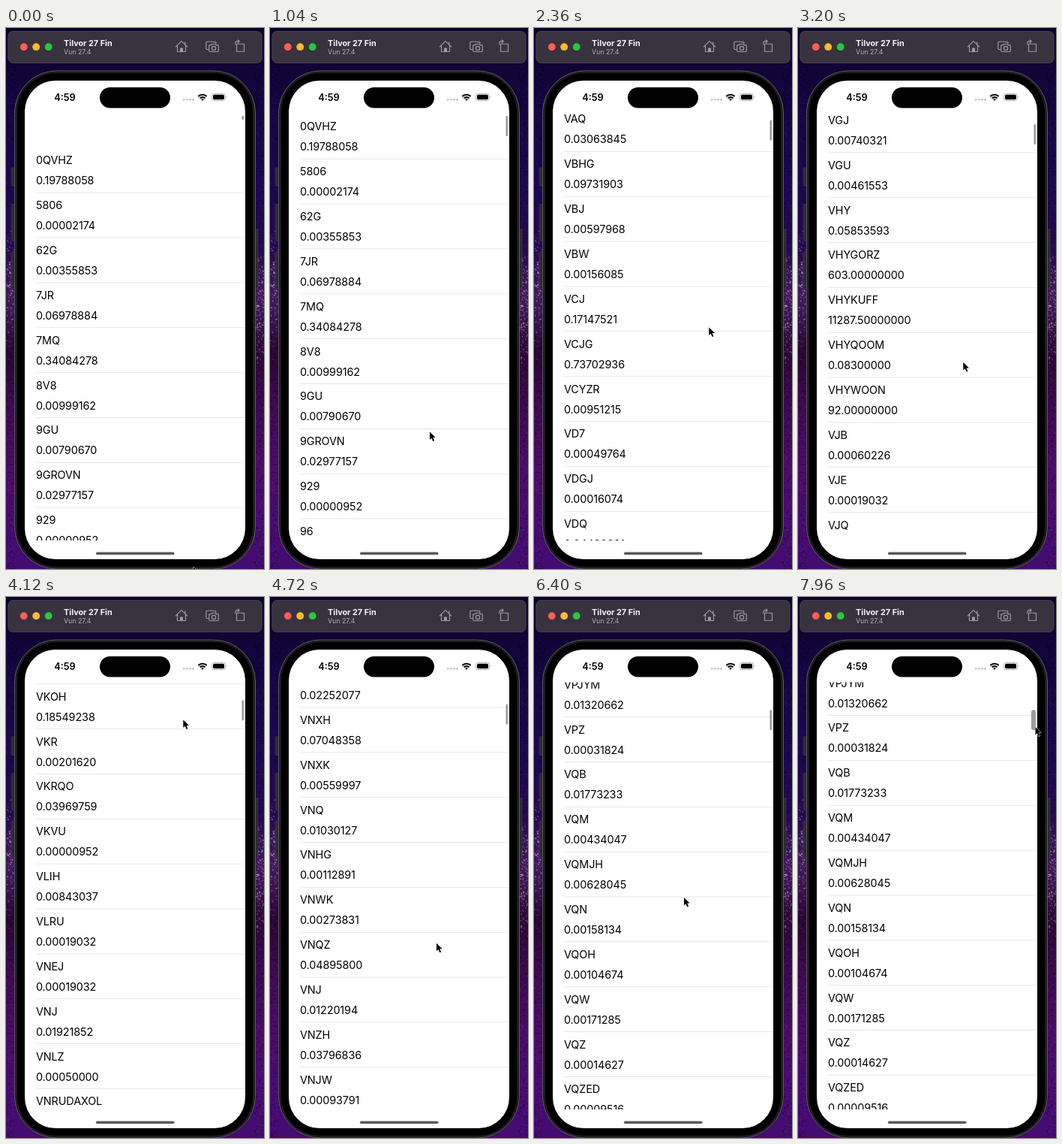
An HTML page with a canvas for the animation above (8000 ms loop, 344 by 720 pixels).

```html
<!DOCTYPE html>
<html lang="en">
<head>
<meta charset="utf-8">
<title>Scrolling price list</title>
<style>
  html, body { margin: 0; width: 100%; height: 100%; overflow: hidden; background: #14043a; }
  canvas, svg { position: absolute; left: 0; top: 0; width: 344px; height: 720px; display: block; }
  text { font-family: Inter, "Liberation Sans", sans-serif; }
  .row text { font-size: 14.4px; letter-spacing: -0.1px; fill: #000; }
  .row rect { fill: #e2e2e3; }
  .icon { fill: none; stroke: #a19aa7; stroke-width: 1.15; stroke-linejoin: round; stroke-linecap: round; }
</style>
</head>
<body>
<canvas id="wall" width="344" height="720"></canvas>
<svg viewBox="0 0 344 720">
  <defs>
    <clipPath id="listArea"><rect x="25" y="113.5" width="294" height="568.5"/></clipPath>
  </defs>

  <!-- window bar -->
  <rect x="2.5" y="4" width="339" height="43" rx="7" fill="#39323f"/>
  <rect x="3" y="4.5" width="338" height="42" rx="6.5" fill="none" stroke="#4d4654" stroke-width=".7"/>
  <circle cx="23.8" cy="25.2" r="4.9" fill="#ff5f57"/>
  <circle cx="40.2" cy="25.2" r="4.9" fill="#febc2e"/>
  <circle cx="56.7" cy="25.2" r="4.9" fill="#28c840"/>
  <text x="77" y="24" font-size="10.8" font-weight="700" fill="#f4f1f6">Tilvor 27 Fin</text>
  <text x="77" y="35.2" font-size="8.8" fill="#b3acb8">Vun 27.4</text>
  <g class="icon">
    <path d="M226.3 25L234 17.700L241.700 25M228.500 23.500V31.500H239.500V23.500M238.900 22V18.800"/>
    <path d="M232.600 31.500V27H235.400V31.500Z" fill="#a19aa7"/>
    <path d="M269.500 28.500H268.300a1.500 1.500 0 0 1-1.500-1.500V19.700a1.500 1.500 0 0 1 1.500-1.500H278.500a1.500 1.500 0 0 1 1.500 1.500V20.500"/>
    <path d="M272.200 22.600H273.800L274.800 21.200H279L280 22.600H281.800a1.500 1.500 0 0 1 1.500 1.500V30a1.500 1.500 0 0 1-1.500 1.500H272.200a1.500 1.500 0 0 1-1.500-1.500V24.100a1.500 1.500 0 0 1 1.500-1.500Z"/>
    <circle cx="277" cy="26.900" r="2.600"/>
    <path d="M307.500 21.200H317.500V31.200H307.500ZM305.800 22V19.500Q305.800 17.800 307.500 17.800H311M309.200 16l2 1.800-2 1.800"/>
  </g>

  <!-- phone body -->
  <g fill="#2b2a2d" stroke="#47464a" stroke-width=".6">
    <rect x="7.300" y="186" width="6" height="24.500" rx="1"/>
    <rect x="7.300" y="234.500" width="6" height="49" rx="1"/>
    <rect x="7.300" y="298.500" width="6" height="49" rx="1"/>
    <rect x="330" y="267.500" width="6" height="80" rx="1"/>
  </g>
  <rect x="11.500" y="57" width="321" height="663" rx="56" fill="#1d1c1e" stroke="#5a595c"/>
  <rect x="15" y="60.300" width="314" height="656.400" rx="52" fill="#000"/>
  <rect x="25" y="70" width="294" height="637" rx="41" fill="#fff"/>

  <g id="list" clip-path="url(#listArea)"><g id="rows"></g></g>
  <rect id="thumb" fill="#9c9c9e"/>

  <!-- status bar -->
  <rect x="125" y="79" width="94" height="27.500" rx="13.700" fill="#000"/>
  <text x="64.300" y="96.700" font-size="12.700" font-weight="600">4:59</text>
  <g fill="#c8c8ca">
    <circle cx="237.300" cy="95.300" r="1.500"/><circle cx="241.300" cy="95.300" r="1.500"/>
    <circle cx="245.300" cy="95.300" r="1.500"/><circle cx="249.300" cy="95.300" r="1.500"/>
  </g>
  <g fill="none" stroke="#000" stroke-width="2.100">
    <path d="M256.300 91.100A8.100 8.100 0 0 1 267.700 91.100M258.500 93.500A5 5 0 0 1 265.500 93.500"/>
    <path d="M260.100 95A2.700 2.700 0 0 1 263.900 95L262 97Z" fill="#000" stroke="none"/>
  </g>
  <rect x="274.500" y="87.300" width="18" height="9.400" rx="3" fill="none" stroke="#a0a0a2" stroke-width=".8"/>
  <rect x="276" y="88.800" width="15" height="6.400" rx="1.800"/>
  <path d="M293.600 90.500q1.400 1.500 0 3Z" fill="#a0a0a2"/>
  <rect x="120" y="697.400" width="104.500" height="3.700" rx="1.850" fill="#5a5a5c"/>

  <path id="cursor" d="M0 0V10.600L2.400 8.300L4.300 12.600L6.100 11.800L4.300 7.600H7.700Z"
        fill="#000" stroke="#fff" stroke-width="1" stroke-linejoin="round" paint-order="stroke"/>
</svg>

<script>
const LOOP = 8000, STEP = 40;
const PITCH = 59.85, COAST = 230;
const $ = id => document.getElementById(id);

function seeded(seed) {
  return () => (seed = (seed * 16807) % 2147483647) / 2147483647;
}

// Wallpaper: vertical nebula gradient with speckles along the visible margins.
function paintWall() {
  const c = $('wall').getContext('2d'), rnd = seeded(77);
  const g = c.createLinearGradient(0, 0, 0, 720);
  const stops = ['#0d0328', '#13043a', '#190748', '#1c0850', '#240a50', '#3d1a58',
                 '#2a0834', '#3d0a50', '#4a0c66', '#4b0c74', '#420c70'];
  stops.forEach((s, i) => g.addColorStop(i / (stops.length - 1), s));
  c.fillStyle = g;
  c.fillRect(0, 0, 344, 720);
  for (let i = 0; i < 5200; i++) {
    const left = i % 2, x = rnd() * 14, y = 48 + rnd() * 672;
    const glow = Math.exp(-(((y - (left ? 345 : 375)) / 45) ** 2));
    const pale = rnd() < glow * 0.7;
    c.globalAlpha = (pale ? 0.7 : 0.32) * rnd();
    c.fillStyle = pale ? '#cf9ad2' : rnd() < 0.6 ? '#08011a' : y < 300 ? '#3a1a90' : '#8f22a6';
    const r = 0.6 + rnd() * 1.5;
    c.fillRect(left ? x : 344 - x, y, r, r);
  }
  c.globalAlpha = 1;
}

// Each block: index of its first row, then name and price pairs.
const BLOCKS = [
  [0, '0QVHZ 0.19788058 5806 0.00002174 62G 0.00355853 7JR 0.06978884 7MQ 0.34084278 8V8 0.00999162 9GU 0.00790670 9GROVN 0.02977157 929 0.00000952 96 0.00047580'],
  [11, 'VAQ 0.03063845 VBHG 0.09731903 VBJ 0.00597968 VBW 0.00156085 VCJ 0.17147521 VCJG 0.73702936 VCYZR 0.00951215 VD7 0.00049764 VDGJ 0.00016074 VDQ 0.04480321'],
  [22, 'VGJ 0.00740321 VGU 0.00461553 VHY 0.05853593 VHYGORZ 603.00000000 VHYKUFF 11287.50000000 VHYQOOM 0.08300000 VHYWOON 92.00000000 VJB 0.00060226 VJE 0.00019032 VJQ 0.00213400'],
  [41, 'VKOH 0.18549238 VKR 0.00201620 VKRQO 0.03969759 VKVU 0.00000952 VLIH 0.00843037 VLRU 0.00019032 VNEJ 0.00019032 VNJ 0.01921852 VNLZ 0.00050000 VNRUDAXOL 0.00731600'],
  [62, 'VPJGORZ 2894.00000000 VPJKUFF 485.70000000 VPJQOOM 0.02157500 VPJU 0.00044724 VPJWOON 0.07710000 VPJYM 0.01320662 VPZ 0.00031824 VQB 0.01773233 VQM 0.00434047 VQMJH 0.00628045 VQN 0.00158134 VQOH 0.00104674 VQW 0.00171285 VQZ 0.00014627 VQZED 0.00009516']
];

function buildRows() {
  const rows = [], rnd = seeded(41), letters = 'QZXWKJHGV';
  for (const [start, data] of BLOCKS) {
    while (rows.length < start) {
      const head = rows[rows.length - 1][0].replace(/\d/g, 'V').slice(0, 2);
      let tail = '';
      for (let n = 1 + Math.floor(rnd() * 2); n > 0; n--) tail += letters[Math.floor(rnd() * 9)];
      rows.push([head + tail, (rnd() * rnd() * 0.09).toFixed(8)]);
    }
    const words = data.split(' ');
    for (let i = 0; i < words.length; i += 2) rows.push([words[i], words[i + 1]]);
  }
  $('rows').innerHTML = rows.map(([name, price], i) =>
    `<g class="row" transform="translate(40 ${(i * PITCH).toFixed(2)})">` +
    `<text y="136.3">${name}</text><text y="163.3">${price}</text>` +
    `<rect y="173.8" width="279" height=".8"/></g>`).join('');
  return [...$('rows').children];
}

// Swipes: start, release, dragged distance, distance coasted after release.
const SWIPES = [
  [1040, 1280, 250, 422],
  [2720, 2900, 240, 568],
  [3280, 3460, 260, 616],
  [3900, 4120, 297, 677],
  [4900, 5090, 298, 622]
];
const dragEase = p => Math.pow(p, 1.7);

function scrollAt(t) {
  if (t < SWIPES[0][0]) {
    const k = 0.012 * Math.max(0, t - 80);
    return t < 120 ? -45 : -45 * (1 + k) * Math.exp(-k);
  }
  let pos = 0;
  for (let i = 0; i < SWIPES.length; i++) {
    const [start, release, drag, coast] = SWIPES[i];
    if (t < release) return pos + drag * dragEase((t - start) / (release - start));
    const next = SWIPES[i + 1] ? SWIPES[i + 1][0] : LOOP;
    pos += drag + coast * (1 - Math.exp(-(Math.min(t, next) - release) / COAST));
    if (t < next) break;
  }
  return pos;
}

// Pointer tip: time, x, y.
const PATH = [
  [0, 250, 717.5], [120, 250, 717.5], [840, 213, 537.5], [1040, 213, 537.5],
  [1280, 226, 287], [1500, 229, 270], [2360, 233.3, 398.5], [2560, 227, 470], [2720, 227, 470],
  [2900, 232, 230], [3200, 220.3, 445], [3280, 220, 465], [3460, 232, 205], [3560, 232, 200],
  [3900, 224, 460], [4120, 236.3, 163.5], [4240, 236, 165], [4640, 222, 460], [4900, 222, 463],
  [5090, 226, 165], [5280, 204, 360.5], [5640, 200, 400], [6800, 200, 400],
  [7400, 316.5, 173], [LOOP, 316.5, 173]
];
const smooth = p => p * p * (3 - 2 * p);

function pointerAt(t) {
  let i = 0;
  while (i < PATH.length - 2 && t >= PATH[i + 1][0]) i++;
  const [t0, x0, y0] = PATH[i], [t1, x1, y1] = PATH[i + 1];
  const dragging = SWIPES.some(s => s[0] === t0);
  const p = (dragging ? dragEase : smooth)((t - t0) / (t1 - t0));
  return [x0 + (x1 - x0) * p, y0 + (y1 - y0) * p];
}

function setThumb(scroll, t) {
  const grab = smooth(Math.min(1, Math.max(0, (t - 7680) / 160)));
  const w = 2.5 + 3.5 * grab;
  const box = {
    x: 317 - w,
    y: 117 + Math.max(0, scroll) / 121,
    width: w,
    height: Math.max(5.2, 27 + Math.min(0, scroll)),
    rx: w / 2
  };
  for (const k in box) $('thumb').setAttribute(k, box[k].toFixed(2));
}

paintWall();
const rowNodes = buildRows();

function draw(now) {
  const t = Math.floor((now % LOOP) / STEP) * STEP;
  const scroll = scrollAt(t);
  $('rows').setAttribute('transform', `translate(0 ${(-scroll).toFixed(2)})`);
  rowNodes.forEach((node, i) => {
    const y = i * PITCH - scroll;
    node.style.display = y > -80 && y < 580 ? '' : 'none';
  });
  setThumb(scroll, t);
  const [x, y] = pointerAt(t);
  $('cursor').setAttribute('transform', `translate(${x.toFixed(2)} ${y.toFixed(2)})`);
  requestAnimationFrame(draw);
}
draw(performance.now());
</script>
</body>
</html>
```
